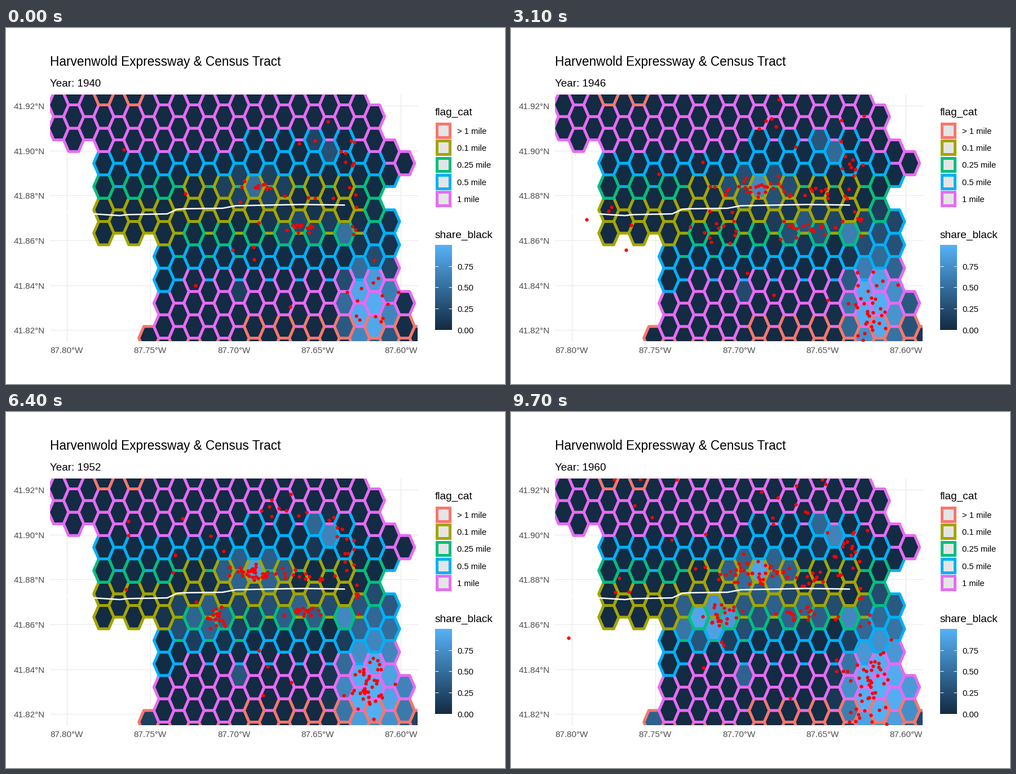
Write a matplotlib script that moves like this. It is 885x632 px and loops after 10000 ms.

```python
import numpy as np
import matplotlib.pyplot as plt
from matplotlib.animation import FuncAnimation
from matplotlib.collections import PolyCollection
from matplotlib.colors import LinearSegmentedColormap
from matplotlib.patches import Rectangle
from matplotlib.path import Path

W, H, DPI = 885, 632, 100
LEFT, TOP, RIGHT, BOTTOM = 78, 118, 730, 556
PT = 72 / DPI            # points per pixel
ASPECT = 1.343           # a degree of latitude is this much longer on screen
DX, DY = 26.68, 41.4     # hexagon column and row steps

RED, OLIVE, GREEN, BLUE, PINK = "#F8766D", "#A3A500", "#00BF7D", "#00B0F6", "#E76BF3"
SHADES = LinearSegmentedColormap.from_list("share", ["#132B43", "#56B1F7"])

plt.rcParams["font.family"] = "Liberation Sans"

# Hexagons whose centers fall inside this outline are drawn
OUTLINE = Path([
    (60, 90), (640, 90), (640, 130), (668, 150), (668, 205), (690, 210), (720, 225),
    (720, 255), (695, 275), (668, 285), (668, 325), (695, 325), (695, 465), (720, 470),
    (720, 530), (745, 535), (745, 585), (266, 585), (240, 565), (240, 535), (266, 535),
    (266, 375), (160, 375), (160, 209), (60, 209)])

ROAD = np.array([
    (78, 324), (121, 326), (155, 330), (202, 333), (215, 331.3), (286, 330), (303, 322),
    (312, 321), (384, 320), (408, 315.5), (470, 314.3), (525, 313.3), (600, 314.3)])

# Flat-topped hot spots of the share: center, radii, level before and after, years
SPOTS = [
    (644, 495, 48, 82, 0.97, 0.97, 1940, 1960),
    (665, 490, 75, 105, 0.00, 0.90, 1940, 1956),
    (655, 365, 50, 50, 0.06, 0.40, 1940, 1952),
    (563, 212, 24, 28, 0.30, 0.70, 1940, 1952),
    (440, 281, 18, 22, 0.35, 0.80, 1940, 1955),
    (440, 282, 70, 33, 0.22, 0.55, 1940, 1954),
    (525, 352, 60, 30, 0.22, 0.42, 1940, 1952),
    (600, 364, 16, 20, 0.50, 0.65, 1940, 1950),
    (350, 368, 60, 38, 0.00, 0.93, 1946, 1960),
    (440, 345, 60, 45, 0.00, 0.30, 1945, 1960),
    (413, 468, 16, 20, 0.15, 0.42, 1940, 1960),
    (245, 556, 22, 26, 0.00, 0.42, 1948, 1960)]

# Point clusters: center, spread, count in the first and in the last year
ZONES = [
    (640, 485, 24, 40, 14, 48), (440, 285, 42, 10, 12, 44), (540, 292, 18, 7, 3, 8),
    (525, 355, 30, 8, 12, 17), (372, 364, 18, 18, 0, 24), (600, 235, 14, 34, 9, 14),
    (622, 335, 5, 22, 4, 5), (510, 165, 55, 28, 3, 12), (230, 260, 85, 85, 3, 11),
    (470, 440, 70, 40, 5, 4)]

FIRST, LAST = 1940, 1960
FRAMES = 100
# Frame at which each new year is fully shown; the step is 5 or 4 frames
STEPS = [6] + [5] * 8 + [4] + [5] * 7 + [4] * 3
STARTS = np.cumsum(STEPS)
JUMP = 50                # this change has no halfway step


def center(col, row):
    return 93.3 + DX * col, 157.2 + DY * (row if col % 2 else row + 0.5)


def hexagon(col, row):
    x, y = center(col, row)
    angle = np.arange(6) * np.pi / 3
    return np.column_stack([x + DX / 1.5 * np.cos(angle),
                            y + DY / np.sqrt(3) * np.sin(angle)])


def densify(line, n):
    t = np.linspace(0, 1, n, endpoint=False)[:, None]
    return np.concatenate([a + t * (b - a) for a, b in zip(line[:-1], line[1:])] + [line[-1:]])


ROUTE = densify(np.vstack([ROAD, (612, 315)]), 15)


def flag_color(poly):
    """Colour by the distance from the hexagon to the road."""
    edge = densify(np.vstack([poly, poly[:1]]), 6)
    gap = edge[:, None] - ROUTE[None]
    dist = np.hypot(gap[..., 0] * ASPECT, gap[..., 1]).min()
    for limit, color in ((20.5, OLIVE), (48.5, GREEN), (97.5, BLUE), (192.5, PINK)):
        if dist <= limit:
            return color
    return RED


def shares(centers, time):
    rest = np.ones(len(centers))
    for x, y, rx, ry, low, high, t0, t1 in SPOTS:
        d2 = ((centers[:, 0] - x) / rx) ** 2 + ((centers[:, 1] - y) / ry) ** 2
        rest *= 1 - np.interp(time, (t0, t1), (low, high)) * np.exp(-d2 ** 2)
    return 1 - rest


def zone_points(year):
    """Points of one year, grouped by zone."""
    growth = np.sqrt((year - FIRST) / (LAST - FIRST))
    rng = np.random.default_rng(year)
    groups = []
    for x, y, sx, sy, few, many in ZONES:
        n = round(few + (many - few) * growth)
        pts = rng.normal((x, y), (sx, sy), (n, 2))
        groups.append(np.clip(pts, (82, 120), (710, 554)))
    return groups


def halfway(a, b):
    n = min(len(a), len(b))
    return np.vstack([(a[:n] + b[:n]) / 2, a[n:]])


YEARS = {year: zone_points(year) for year in range(FIRST, LAST + 1)}


def state(frame):
    """Label year, time on the share scale, and point positions."""
    year = FIRST + int(np.sum(frame >= STARTS))
    groups = YEARS[year]
    if frame + 1 in STARTS and frame + 1 != JUMP:
        mixed = [halfway(a, b) for a, b in zip(groups, YEARS[year + 1])]
        return year, year + 0.5, np.vstack(mixed)
    return year, year, np.vstack(groups)


fig = plt.figure(figsize=(W / DPI, H / DPI), dpi=DPI, facecolor="white")
ax = fig.add_axes([0, 0, 1, 1])
ax.axis("off")
panel = Rectangle((LEFT, TOP), RIGHT - LEFT, BOTTOM - TOP, fc="none", ec="none")
ax.add_patch(panel)


def label(x, y, text, px, color="black", ha="left"):
    return ax.text(x, y, text, size=px * PT, color=color, ha=ha, va="baseline")


# Grid and axis labels
for i in range(5):
    x = 107.6 + 148.2 * i
    ax.plot([x, x], [TOP, BOTTOM], color="#EBEBEB", lw=1.4 * PT, zorder=0)
    label(x, 577, f"{87.8 - 0.05 * i:.2f}°W", 15.2, "#4D4D4D", "center")
for i in range(6):
    y = 138 + 79.65 * i
    ax.plot([LEFT, RIGHT], [y, y], color="#EBEBEB", lw=1.4 * PT, zorder=0)
    label(69, y + 6, f"{41.92 - 0.02 * i:.2f}°N", 15.2, "#4D4D4D", "right")

# Even columns lie below odd ones; within each, southern rows come first
cells = [(c, r) for c in range(25) for r in range(-1, 11)
         if OUTLINE.contains_point(center(c, r))]
cells.sort(key=lambda cell: (cell[0] % 2, -cell[1]))
centers = np.array([center(*cell) for cell in cells])
polys = [hexagon(*cell) for cell in cells]

tiles = PolyCollection(polys, edgecolors=[flag_color(p) for p in polys],
                       linewidths=5 * PT, joinstyle="round", zorder=1)
ax.add_collection(tiles)
dots, = ax.plot([], [], "o", ms=6.3 * PT, color="red", mew=0, zorder=2)
road, = ax.plot(*ROAD.T, color="white", lw=2.5 * PT, zorder=3)
for artist in (tiles, dots, road):
    artist.set_clip_path(panel)

label(78, 67.5, "Harvenwold Expressway & Census Tract", 22.6)
year_text = label(78, 103.5, "", 18.9)

# Legends
label(760.5, 155, "flag_cat", 19.2)
flags = [("> 1 mile", RED), ("0.1 mile", OLIVE), ("0.25 mile", GREEN),
         ("0.5 mile", BLUE), ("1 mile", PINK)]
for i, (name, color) in enumerate(flags):
    y = 181.8 + 30.35 * i
    ax.add_patch(Rectangle((763.7, y - 11.8), 23.6, 23.6, fc="#E5E5E5", ec=color,
                           lw=5 * PT, joinstyle="miter"))
    label(800, y + 6, name, 14.8)

label(760.5, 373, "share_black", 19.2)
ax.imshow(np.linspace(1, 0, 256)[:, None], cmap=SHADES, aspect="auto",
          extent=(761, 790.5, 536, 385), zorder=1)
for i in range(4):
    y = 535.5 - 37.6 * i
    for x in (761, 784.7):
        ax.plot([x, x + 5.8], [y, y], color="white", lw=1 * PT, solid_capstyle="butt")
    label(800, y + 6, f"{0.25 * i:.2f}", 14.8)
ax.set(xlim=(0, W), ylim=(H, 0))


def draw(frame):
    year, time, points = state(frame)
    year_text.set_text(f"Year: {year}")
    tiles.set_facecolor(SHADES(shares(centers, time)))
    dots.set_data(points[:, 0], points[:, 1])
    return tiles, dots, year_text


anim = FuncAnimation(fig, draw, frames=FRAMES, interval=100, repeat=True,
                     repeat_delay=0, blit=False)
plt.show()
```
